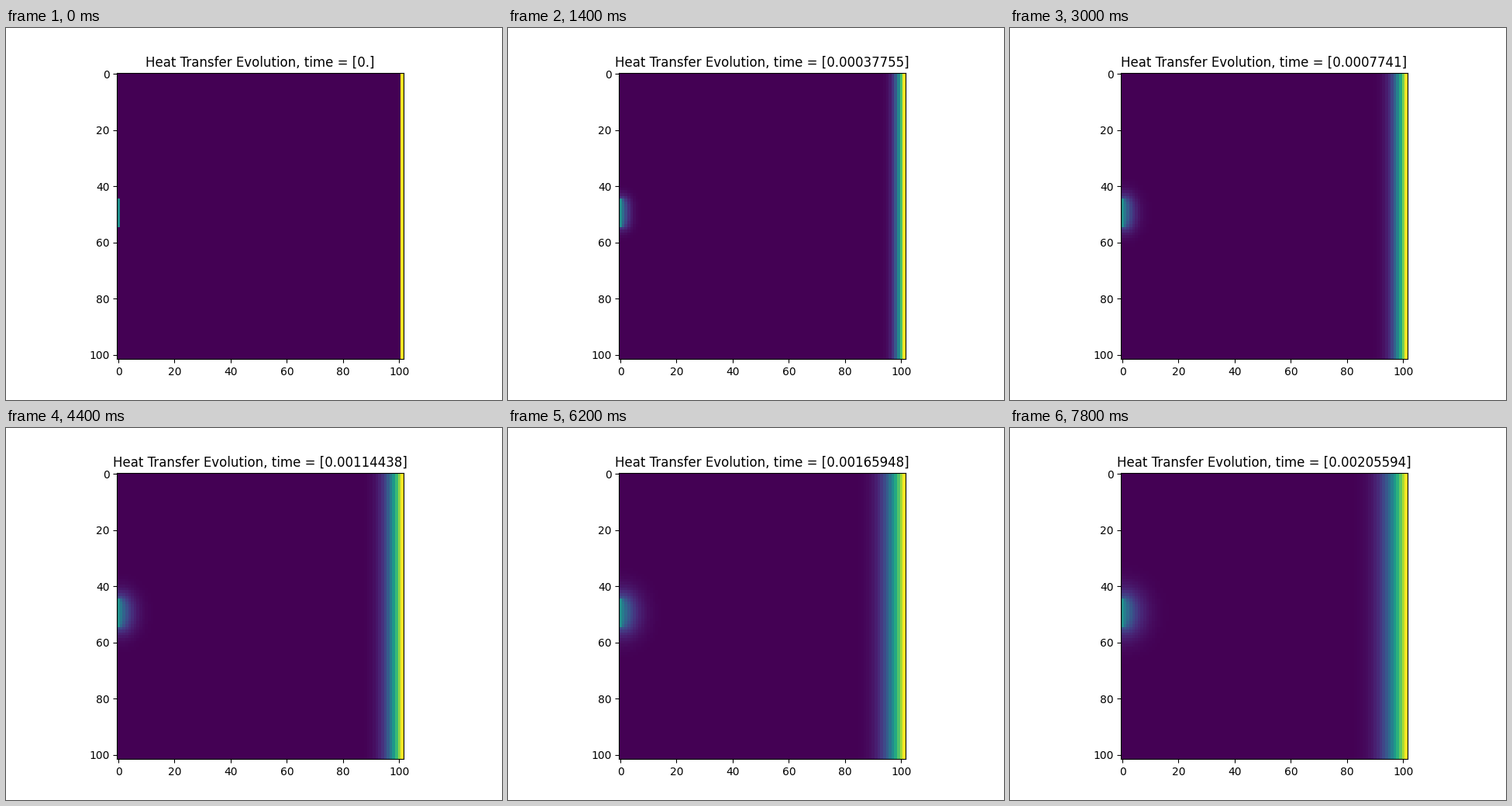
Recreate the animation shown at these times as a matplotlib script. Size 640x480 px, loop 8000 ms.

```python
import numpy as np
import matplotlib.pyplot as plt
from matplotlib.animation import FuncAnimation

N = 102            # grid points per side, outer ring is the boundary
RATE = 1e4         # diffusivity / dx**2
STEP = 2.5e-6      # largest integration step
FRAMES = 40

# Simulated time runs slightly unevenly: key points, linear in between.
CLOCK = {0: 0, 4: 0.00015291, 7: 0.00037755, 15: 0.0007741,
         22: 0.00114438, 31: 0.00165948, 39: 0.00205594}
times = np.interp(range(FRAMES), list(CLOCK), list(CLOCK.values()))


def apply_edges(u):
    """Insulated walls, a hot right wall and a warm patch on the left."""
    u[0], u[-1] = u[1], u[-2]
    u[:, 0] = u[:, 1]
    u[45:55, 0] = 50
    u[:, -1] = 100


def advance(u, span):
    steps = max(1, int(np.ceil(span / STEP)))
    k = RATE * span / steps
    for _ in range(steps):
        lap = (u[:-2, 1:-1] + u[2:, 1:-1] + u[1:-1, :-2] + u[1:-1, 2:]
               - 4 * u[1:-1, 1:-1])
        u[1:-1, 1:-1] += k * lap
        apply_edges(u)


def solve():
    u = np.zeros((N, N))
    apply_edges(u)
    states = [u.copy()]
    for span in np.diff(times):
        advance(u, span)
        states.append(u.copy())
    return states


states = solve()

fig, ax = plt.subplots(figsize=(6.4, 4.8), dpi=100)
image = ax.imshow(states[0], cmap="viridis", vmin=0, vmax=100)
title = ax.set_title("")


def update(i):
    image.set_data(states[i])
    title.set_text(f"Heat Transfer Evolution, time = {times[i:i + 1]}")
    return image, title


anim = FuncAnimation(fig, update, frames=FRAMES, interval=200,
                     repeat=True, repeat_delay=0, blit=False)
plt.show()
```
